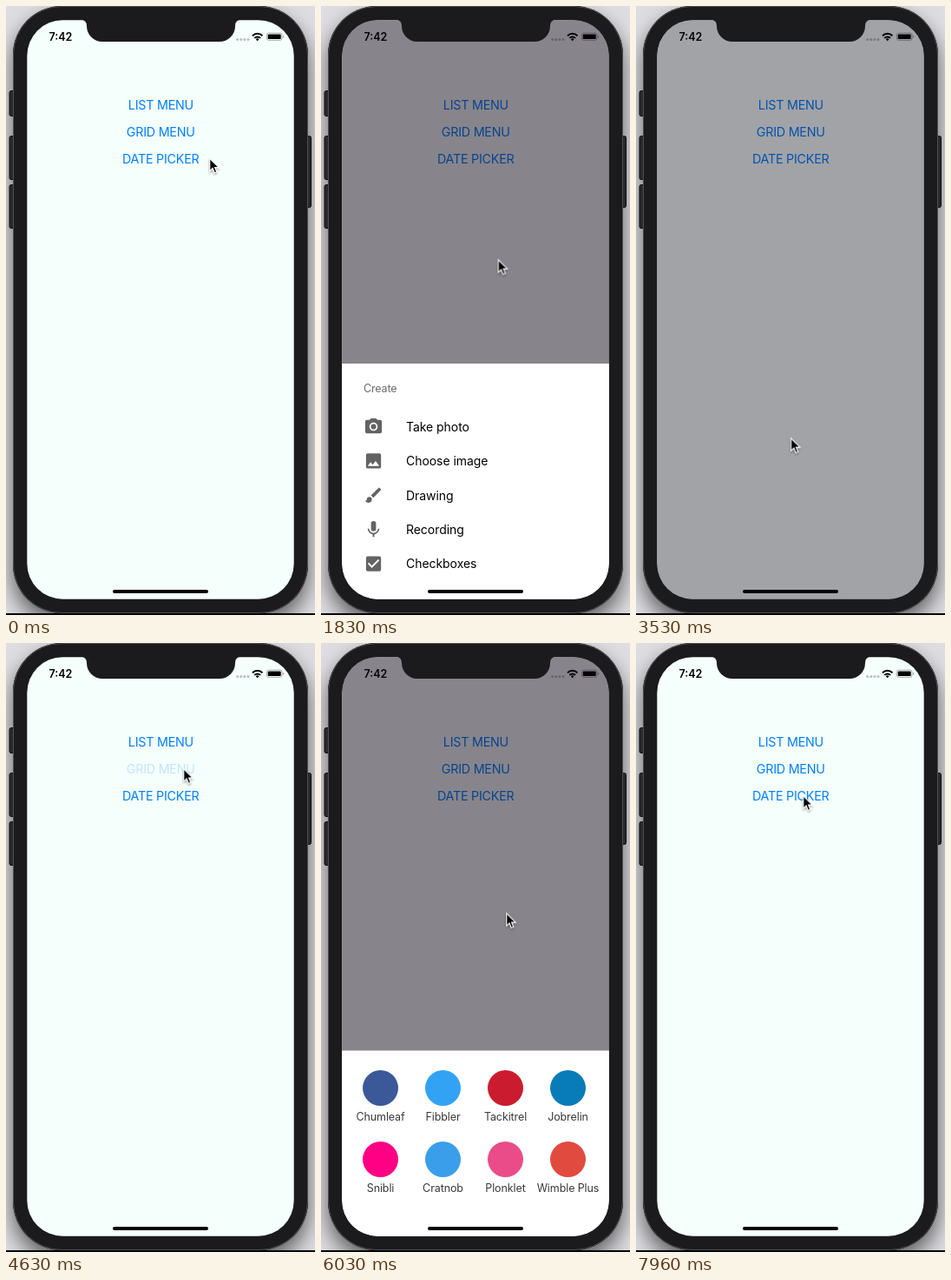
Animation of 356 by 700 pixels, one loop 8 s. Source, as an HTML page:

```html
<!DOCTYPE html>
<html lang="en">
<head>
<meta charset="utf-8">
<title>Bottom sheet demo</title>
<style>
html, body { margin: 0; width: 100%; height: 100%; overflow: hidden; background: #000; }
svg { display: block; width: 356px; height: 700px; font-family: Inter, "Open Sans", sans-serif; }
.time { font-size: 12.5px; font-weight: 600; }
.menu { font-size: 14.3px; letter-spacing: -.23px; fill: #007fff; text-anchor: middle; }
.title { font-size: 12.5px; letter-spacing: -.15px; fill: #6a6a6a; }
.row text { font-size: 14px; letter-spacing: -.05px; }
.row path { fill: #636363; }
.cell text { font-size: 12.5px; letter-spacing: -.1px; fill: #3a3a3a; text-anchor: middle; }
.dim { fill: rgb(16, 0, 18); fill-opacity: .48; }

/* 1% = 80 ms */
.anim { animation: 8s linear infinite; }
#cursor { animation-name: cursor; }
#touch { animation-name: touch; animation-timing-function: step-end; }
#listButton { animation-name: listButton; }
#gridButton { animation-name: gridButton; }
#listModal { animation-name: listModal; }
#gridModal { animation-name: gridModal; }
#listSheet { animation-name: listSheet; animation-timing-function: ease-in-out; }
#gridSheet { animation-name: gridSheet; animation-timing-function: ease-in-out; }
#row1 { animation-name: rowPress; }
#cell2 { animation-name: cellPress; }

@keyframes cursor {
  0%, .375% { transform: translate(234px, 174px); animation-timing-function: ease-in-out; }
  5%, 15.625% { transform: translate(187px, 110px); animation-timing-function: ease-in; }
  17.875% { transform: translate(187.5px, 151px); animation-timing-function: ease-out; }
  22.875%, 27.5% { transform: translate(203.5px, 290.5px); animation-timing-function: ease-in-out; }
  37.5%, 43.125% { transform: translate(172px, 518px); animation-timing-function: ease-in-out; }
  47.875% { transform: translate(234px, 277px); }
  48.25%, 50.75% { transform: translate(231px, 273px); animation-timing-function: ease-in-out; }
  55.25%, 67.5% { transform: translate(204px, 143.5px); animation-timing-function: ease-in; }
  70.625% { transform: translate(201px, 200px); animation-timing-function: ease-out; }
  75.375%, 80% { transform: translate(213px, 309.5px); animation-timing-function: ease-in-out; }
  86.875%, 93.125% { transform: translate(206px, 514px); animation-timing-function: ease-in-out; }
  99.5%, 100% { transform: translate(192px, 174.5px); }
}
@keyframes touch {
  0%, 9.625%, 40%, 57.75%, 88.25%, 100% { opacity: 0; }
  7.5%, 37.875%, 56.125%, 87.25% { opacity: 1; }
}
@keyframes listButton {
  0%, 7.5%, 12.75%, 100% { opacity: 1; }
  8.75%, 9.625% { opacity: .2; }
}
@keyframes gridButton {
  0%, 56.25%, 61.5%, 100% { opacity: 1; }
  57.375%, 58.75% { opacity: .2; }
}
@keyframes rowPress {
  0%, 37.875%, 43.125%, 100% { opacity: 1; }
  38.875%, 40% { opacity: .2; }
}
@keyframes cellPress {
  0%, 87.25%, 91.25%, 100% { opacity: 1; }
  88%, 88.125% { opacity: .2; animation-timing-function: ease-out; }
}
@keyframes listModal {
  0%, 10%, 47%, 100% { opacity: 0; }
  13.75%, 43.25% { opacity: 1; }
}
@keyframes gridModal {
  0%, 58.75%, 95%, 100% { opacity: 0; }
  60.75%, 91.375% { opacity: 1; }
}
@keyframes listSheet {
  0%, 10%, 43.25%, 100% { transform: translateY(271px); }
  13.75%, 40.125% { transform: translateY(0); }
}
@keyframes gridSheet {
  0%, 58.75%, 91.325%, 100% { transform: translateY(214px); }
  61.625%, 88.2% { transform: translateY(0); }
}
</style>
</head>
<body>
<svg viewBox="0 0 356 700">
  <defs>
    <clipPath id="desk"><rect width="356" height="698"/></clipPath>
    <clipPath id="screen"><rect x="24.300" y="16.200" width="307.400" height="665.500" rx="41"/></clipPath>
    <filter id="phoneShade" x="-20%" y="-10%" width="140%" height="120%">
      <feDropShadow dx="0" dy="12" stdDeviation="12" flood-opacity=".58"/>
    </filter>
    <filter id="shade" x="-60%" y="-40%" width="220%" height="200%">
      <feDropShadow dx="0" dy="1.5" stdDeviation="1.2" flood-opacity=".4"/>
    </filter>
  </defs>

  <g clip-path="url(#desk)">
    <rect width="356" height="698" fill="#dedee2"/>
    <rect x="8" width="340" height="698" rx="56" filter="url(#phoneShade)"/>
    <g fill="#29292b" stroke="#111113">
      <rect x="4" y="97.500" width="8" height="29" rx="2"/>
      <rect x="4" y="149.500" width="8" height="50" rx="2"/>
      <rect x="4" y="205.500" width="8" height="50" rx="2"/>
      <rect x="344" y="149.500" width="7.500" height="82" rx="2"/>
    </g>
    <rect x="8.500" y=".5" width="339" height="697" rx="55.500" fill="#1b1b1d" stroke="#505053"/>
  </g>

  <g clip-path="url(#screen)">
    <rect x="24" y="16" width="308" height="666" fill="#f5fffc"/>
    <text class="time" x="49.500" y="39.700">7:42</text>
    <g fill="#b9bfc0">
      <circle cx="266.700" cy="38.500" r="1.500"/>
      <circle cx="270.800" cy="38.500" r="1.500"/>
      <circle cx="274.900" cy="38.500" r="1.500"/>
      <circle cx="279" cy="38.500" r="1.500"/>
    </g>
    <g fill="none" stroke="#000" stroke-width="2">
      <path d="M284 34.200a8 8 0 0 1 11.400 0"/>
      <path d="M286.300 36.900a4.800 4.800 0 0 1 6.800 0"/>
    </g>
    <path d="M287.800 38.200a2.700 2.700 0 0 1 3.800 0l-1.900 2z"/>
    <rect x="300.400" y="31.100" width="17.600" height="8.300" rx="2.300" fill="none" stroke="#000" stroke-opacity=".4" stroke-width=".8"/>
    <rect x="301.700" y="32.400" width="15" height="5.700" rx="1.200"/>
    <path d="M319 33.800a1.700 1.700 0 0 1 0 3z" fill-opacity=".45"/>

    <text id="listButton" class="menu anim" x="178.400" y="119">LIST MENU</text>
    <text id="gridButton" class="menu anim" x="178.200" y="150">GRID MENU</text>
    <text class="menu" x="178.200" y="181">DATE PICKER</text>

    <g id="listModal" class="anim">
      <rect class="dim" x="24" y="16" width="308" height="666"/>
      <g id="listSheet" class="anim">
        <rect x="24" y="411" width="308" height="271" fill="#fff"/>
        <text class="title" x="49" y="444.300">Create</text>
      </g>
    </g>
    <g id="gridModal" class="anim">
      <rect class="dim" x="24" y="16" width="308" height="666"/>
      <g id="gridSheet" class="anim">
        <rect x="24" y="468.500" width="308" height="214" fill="#fff"/>
      </g>
    </g>
    <rect x="123" y="671" width="110" height="4" rx="2"/>
  </g>

  <path d="M86 15.500q7 .5 7 7.500a18 18 0 0 0 18 18h135a18 18 0 0 0 18-18q0-7 7-7.500z" fill="#1b1b1d"/>

  <g id="cursor" class="anim">
    <circle id="touch" class="anim" cx="1" cy="3" r="16.500" fill="#888" fill-opacity=".36" stroke="#777" stroke-opacity=".75"/>
    <path d="M.8 1.300v14.300l3.300-3.100 2.200 5.200 2.500-1-2.200-5.100h4.600z" stroke="#fff" stroke-width="1.100" filter="url(#shade)"/>
  </g>
</svg>
<script>
const NS = "http://www.w3.org/2000/svg";

function add(parent, tag, attrs, text = "") {
  const node = document.createElementNS(NS, tag);
  for (const key in attrs) node.setAttribute(key, attrs[key]);
  node.textContent = text;
  return parent.appendChild(node);
}

const rows = [
  ["Take photo", "M9 2L7.170 4H4c-1.100 0-2 .9-2 2v12c0 1.100.9 2 2 2h16c1.100 0 2-.9 2-2V6c0-1.100-.9-2-2-2h-3.170L15 2zM12 17a5 5 0 1 1 0-10 5 5 0 0 1 0 10zM12 8.800a3.200 3.200 0 1 0 0 6.400 3.200 3.200 0 0 0 0-6.400z"],
  ["Choose image", "M21 19V5a2 2 0 0 0-2-2H5a2 2 0 0 0-2 2v14a2 2 0 0 0 2 2h14a2 2 0 0 0 2-2zM8.500 13.500l2.500 3 3.500-4.500 4.500 6H5z"],
  ["Drawing", "M7 14a3 3 0 0 0-3 3c0 1.300-1.160 2-2 2 .9 1.200 2.500 2 4 2a4 4 0 0 0 4-4 3 3 0 0 0-3-3zM20.700 4.630l-1.330-1.340a1 1 0 0 0-1.410 0L9 12.250 11.750 15l8.950-8.960a1 1 0 0 0 0-1.410z"],
  ["Recording", "M12 14a3 3 0 0 0 3-3V5a3 3 0 0 0-6 0v6a3 3 0 0 0 3 3zM17.300 11a5.300 5.100 0 0 1-10.600 0H5c0 3.400 2.700 6.200 6 6.700V21h2v-3.300c3.300-.5 6-3.300 6-6.700z"],
  ["Checkboxes", "M19 3H5a2 2 0 0 0-2 2v14a2 2 0 0 0 2 2h14a2 2 0 0 0 2-2V5a2 2 0 0 0-2-2zM10 17l-5-5 1.400-1.400 3.600 3.600 7.600-7.600L19 8z"]
];
const cells = [
  ["Chumleaf", "#3b5998"], ["Fibbler", "#32a3f2"], ["Tackitrel", "#cb1b2f"], ["Jobrelin", "#087cb8"],
  ["Snibli", "#ff0084"], ["Cratnob", "#3a9eea"], ["Plonklet", "#ea4c89"], ["Wimble Plus", "#e04a3f"]
];

rows.forEach(([label, icon], i) => {
  const y = 483.5 + i * 39.4;
  const row = add(listSheet, "g", { id: "row" + i, class: "row anim" });
  add(row, "path", { d: icon, "fill-rule": "evenodd", transform: `translate(49 ${y - 11.5}) scale(.96)` });
  add(row, "text", { x: 98, y: y + 5.2 }, label);
});

cells.forEach(([label, color], i) => {
  const x = 68.5 + (i % 4) * 72;
  const y = 511.5 + Math.floor(i / 4) * 82;
  const cell = add(gridSheet, "g", { id: "cell" + i, class: "cell anim" });
  add(cell, "circle", { cx: x, cy: y, r: 20.5, fill: color });
  add(cell, "text", { x, y: y + 37.5 }, label);
});
</script>
</body>
</html>
```
